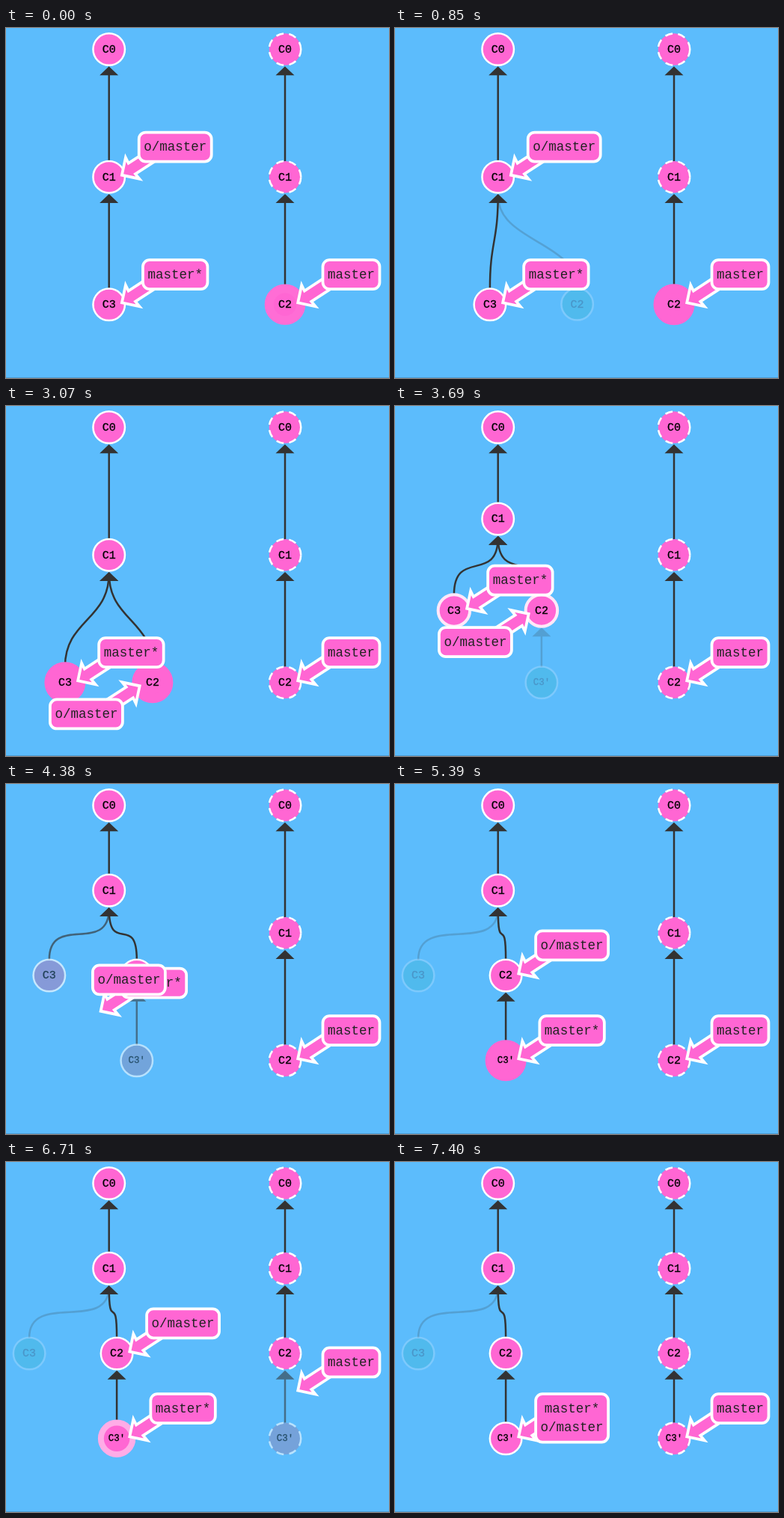
An HTML page that plays this animation: 512x468 px, repeating every 8.72 s.

```html
<!DOCTYPE html>
<html lang="en">
<head>
<meta charset="utf-8">
<title>Commit tree</title>
<style>
  html, body { margin: 0; width: 100%; height: 100%; overflow: hidden; background: #5cbcfc; }
  svg { display: block; width: 512px; height: 468px; }
  text { font-family: "Courier New", "Liberation Mono", monospace; text-anchor: middle; }
  .edge { fill: none; stroke: #333; stroke-width: 2.5; }
  .head { fill: #333; stroke: #333; stroke-width: 2.5; }
  .name { stroke: #000; stroke-width: .3; }
  .tag { fill: #ff66d3; stroke: #fff; stroke-width: 3.75; }
  .tagText { font-size: 17.5px; fill: #222; }
</style>
</head>
<body>
<svg viewBox="0 0 512 468">
  <rect width="512" height="468" fill="#5cbcfc"/>
  <rect y="467" width="512" height="1" fill="#4d9bd0"/>
  <g id="edges"></g><g id="nodes"></g><g id="tags"></g>
</svg>
<script>
const LOOP = 8720;
const PINK = [255, 102, 211], TEAL = [36, 179, 179], WHITE = [255, 255, 255];
const RADIUS = 21.25, STROKE = 2.5, BEND = 62.5;
const LEFT = 137.7, RIGHT = 373;

// Rows of a three-level tree (wide) and of a four-level tree (tight).
const TOP = 28.6, WIDE = 199.2, TIGHT1 = 142.3, TIGHT2 = 256, BOTTOM = 369.8;
// Columns while one sibling is orphaned, and while both count equally.
const HEAVY_L = 126.9, LIGHT_R = 243.9, EVEN_L = 78.9, EVEN_R = 195.9, LIGHT_L = 31.1, HEAVY_R = 148.1;

const at = {
  glowRemote: -340, birthC2: 270, fetch: 1100, glowC2: 1870, glowC3: 2600,
  birthCopy: 3400, rebase: 4195, glowCopy: 4920, birthRemote: 5735, push: 6521, join: 6950
};

const mix = (a, b, p) => a + (b - a) * p;
const clamp = p => Math.min(1, Math.max(0, p));
const blend = (a, b, p) => `rgb(${a.map((v, i) => Math.round(mix(v, b[i], p)))})`;

function ease(n) {
  const q = .48 - n / 1.04, r = Math.sqrt(.1734 + q * q);
  const t = clamp(Math.cbrt(r - q) + Math.cbrt(-r - q) + .5);
  return t * t * (3 - 2 * t);
}

function bounce(n) {
  const s = 7.5625, p = 2.75;
  if (n < 1 / p) return s * n * n;
  if (n < 2 / p) return s * (n - 1.5 / p) ** 2 + .75;
  if (n < 2.5 / p) return s * (n - 2.25 / p) ** 2 + .9375;
  return s * (n - 2.625 / p) ** 2 + .984375;
}

// A value over time: its start and moves of [time, goal, duration, easing].
const track = (start, ...moves) => t => moves.reduce(
  (v, [from, goal, time = 400, curve = ease]) => mix(v, goal, curve(clamp((t - from) / time))), start);
const drop = (time, goal) => [time, goal, 800, bounce];

function add(parent, tag, attrs = {}, text = "") {
  const el = document.createElementNS("http://www.w3.org/2000/svg", tag);
  set(el, attrs);
  el.textContent = text;
  return parent.appendChild(el);
}
function set(el, attrs) {
  for (const key in attrs) el.setAttribute(key, attrs[key]);
}
const layer = id => document.getElementById(id);

function makeNode({ name, x, y, parent, life = track(1), glow = track(0), born = -1, dashFrom = null }) {
  const g = add(layer("nodes"), "g");
  const circle = add(g, "circle", { r: RADIUS });
  const label = add(g, "text", { class: "name", dy: ".29em", "font-size": name.length < 3 ? 15 : 12.5 }, name);
  const link = parent && add(layer("edges"), "g");
  const edge = link && add(link, "path", { class: "edge" });
  const head = link && add(link, "path", { class: "head" });

  function draw(t) {
    const cx = x(t), cy = y(t), alive = life(t), lit = glow(t);
    const opacity = t < born ? 0 : mix(.2, 1, alive);
    const line = STROKE * (1 + 4 * lit);
    set(g, { opacity });
    set(circle, {
      cx, cy,
      fill: blend(TEAL, PINK, alive),
      stroke: blend(WHITE, PINK, lit),
      "stroke-width": line,
      "stroke-dasharray": dashFrom !== null && t >= dashFrom ? `${4 * line} ${3 * line}` : "none"
    });
    set(label, { x: cx, y: cy });
    if (!link) return;
    const px = parent.x(t), py = parent.y(t);
    const y1 = py + 24.5, y2 = Math.max(cy - RADIUS, y1), bend = Math.min(BEND, y2 - y1);
    set(link, { opacity });
    set(edge, { d: `M${cx} ${y2}C${cx} ${y2 - bend} ${px} ${y1 + bend} ${px} ${y1}` });
    set(head, { d: `M${px} ${y1}l9.4 9h-18.8z` });
  }
  return { x, y, draw };
}

// Arrow outline as [distance behind the tip, distance from the axis].
const ARROW = [[0, 0], [17, 17], [16, 8.5], [50, 8.5], [50, -8.5], [16, -8.5], [17, -17]];
const COS = Math.cos(.576), SIN = Math.sin(.576);

// side: 1 puts the tag above right of its commit, -1 below left.
function makeTag({ name, x, y, side = track(1), width = track(name.length * 10.5 + 13),
                   tall = track(0), shift = track(0), solid = track(1) }) {
  const g = add(layer("tags"), "g");
  const box = add(g, "g");
  const arrow = add(box, "path", { class: "tag" });
  const rect = add(box, "rect", { class: "tag", rx: 9 });
  const label = add(g, "text", { class: "tagText", dy: ".3em" }, name);

  return {
    draw(t) {
      const s = side(t), w = width(t), low = 1 - s;
      const cx = x(t) + 88.5 * s, cy = y(t) - 40.2 * s + low;
      const tipX = x(t) + 17.2 * s, tipY = y(t) - 2.5 * s + low;
      const points = ARROW.map(([b, n]) =>
        `${tipX + s * (b * COS - n * SIN)} ${tipY - s * (b * SIN + n * COS)}`);
      set(box, { opacity: solid(t) });
      set(arrow, { d: `M${points.join("L")}Z` });
      set(rect, { x: cx - w / 2, y: cy - 19.5, width: w, height: 39 + tall(t) });
      set(label, { x: cx, y: cy + shift(t) });
    }
  };
}

const left = track(LEFT), right = track(RIGHT), top0 = track(TOP);

const c0 = makeNode({ name: "C0", x: left, y: top0 });
const c1 = makeNode({ name: "C1", parent: c0, x: left, y: track(WIDE, [at.birthCopy, TIGHT1]) });
const c2 = makeNode({
  name: "C2", parent: c1, born: at.birthC2,
  x: track(LEFT, drop(at.birthC2, LIGHT_R), [at.fetch, EVEN_R], [at.rebase, HEAVY_R]),
  y: track(WIDE, drop(at.birthC2, BOTTOM), [at.birthCopy, TIGHT2]),
  life: track(0, [at.fetch, 1]),
  glow: track(0, [at.glowC2, 1], [at.birthCopy, 0])
});
const c3 = makeNode({
  name: "C3", parent: c1,
  x: track(LEFT, [at.birthC2, HEAVY_L], [at.fetch, EVEN_L], [at.rebase, LIGHT_L]),
  y: track(BOTTOM, [at.birthCopy, TIGHT2]),
  life: track(1, [at.rebase, 0]),
  glow: track(0, [at.glowC3, 1], [at.birthCopy, 0])
});
const copy = makeNode({
  name: "C3'", parent: c2, born: at.birthCopy,
  x: track(EVEN_R, [at.rebase, HEAVY_R]),
  y: track(TIGHT2, drop(at.birthCopy, BOTTOM)),
  life: track(0, [at.rebase, 1]),
  glow: track(0, [at.glowCopy, 1], [at.push, 0])
});

const r0 = makeNode({ name: "C0", x: right, y: top0, dashFrom: 0 });
const r1 = makeNode({ name: "C1", parent: r0, x: right, dashFrom: 0, y: track(WIDE, [at.birthRemote, TIGHT1]) });
const r2 = makeNode({
  name: "C2", parent: r1, x: right, dashFrom: at.fetch,
  y: track(BOTTOM, [at.birthRemote, TIGHT2]),
  glow: track(0, [at.glowRemote, 1], [at.fetch, 0])
});
const r3 = makeNode({
  name: "C3'", parent: r2, x: right, dashFrom: 0, born: at.birthRemote,
  y: track(TIGHT2, drop(at.birthRemote, BOTTOM)),
  life: track(0, [at.push, 1])
});

const tall = track(0, [at.join, 25.5]);
const master = makeTag({
  name: "master*", tall,
  x: track(LEFT, [at.birthC2, HEAVY_L], [at.fetch, EVEN_L], [at.rebase, HEAVY_R]),
  y: track(BOTTOM, [at.birthCopy, TIGHT2], [at.rebase, BOTTOM]),
  width: track(86.5, [at.join, 97])
});
const tracking = makeTag({
  name: "o/master", tall,
  x: track(LEFT, [at.fetch, EVEN_R], [at.rebase, HEAVY_R]),
  y: track(WIDE, [at.fetch, BOTTOM], [at.birthCopy, TIGHT2], [at.join, BOTTOM]),
  side: track(1, [at.fetch, -1], [at.rebase, 1]),
  shift: track(0, [at.join, 25]),
  solid: track(1, [at.join, 0])
});
const remote = makeTag({
  name: "master", x: right,
  y: track(BOTTOM, [at.birthRemote, TIGHT2], [at.push, BOTTOM])
});

const parts = [c0, c1, c2, c3, copy, r0, r1, r2, r3, master, tracking, remote];
const begin = performance.now();
function frame() {
  const t = (performance.now() - begin) % LOOP;
  parts.forEach(part => part.draw(t));
  requestAnimationFrame(frame);
}
frame();
</script>
</body>
</html>
```
